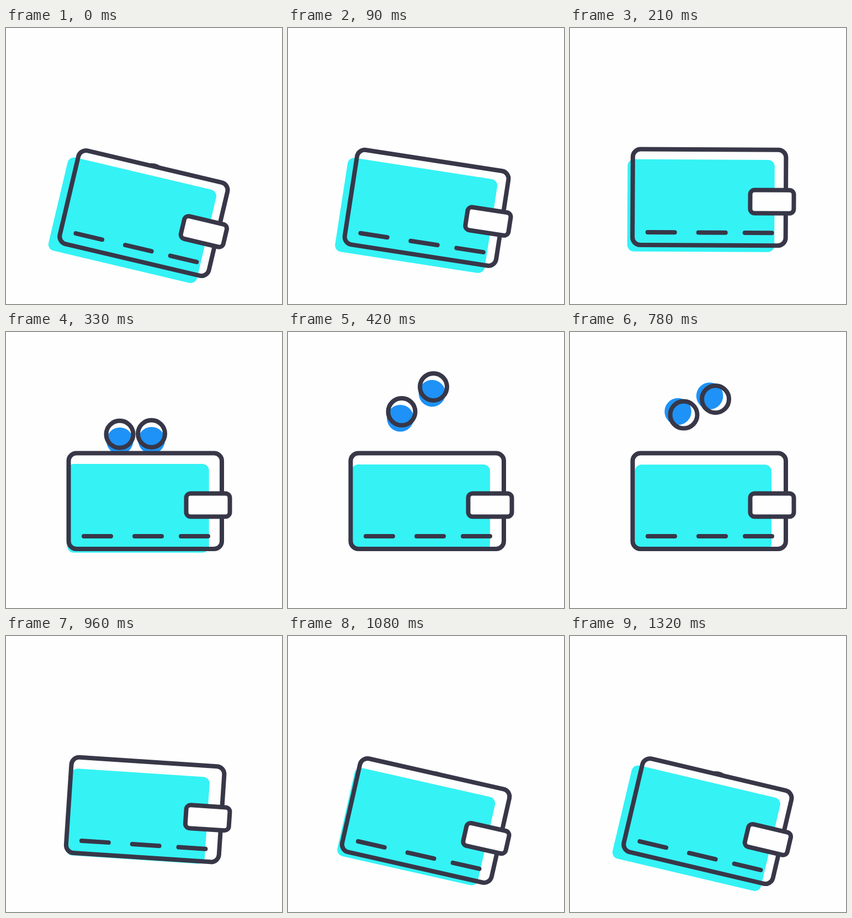
Write an HTML page with a canvas that moves like this. It is 500 px wide and 500 px high and loops after 1350 ms.

```html
<!DOCTYPE html>
<html lang="en">
<head>
<meta charset="utf-8">
<title>Wallet and coins</title>
<style>
  html, body { margin: 0; height: 100%; overflow: hidden; background: #fefefe; }
  canvas { display: block; width: 100vw; height: 100vh; }
</style>
</head>
<body>
<canvas id="stage" width="500" height="500"></canvas>
<script>
const ctx = document.getElementById('stage').getContext('2d');
const LOOP = 1350, STEP = 30;
const INK = '#373748', CYAN = '#35f2f5', BLUE = '#1e92f6', PAPER = '#fefefe';
const DEG = Math.PI / 180, TILT = 13.3 * DEG;
const PIVOT = { x: 125, y: 308.5 }, COIN_REST = 273.5;

const COINS = [
  { x: 206, top: 144.5, rise: 180, fall: 750 },
  { x: 263.5, top: 90.5, rise: 212, fall: 717 }
];

const mix = (a, b, k) => a + (b - a) * k;

function ease(t, start, end) {
  const u = Math.min(1, Math.max(0, (t - start) / (end - start)));
  return u * u * (3 - 2 * u);
}

function box(left, top, right, bottom, radius, fill, stroke) {
  ctx.beginPath();
  ctx.roundRect(left, top, right - left, bottom - top, radius);
  if (fill) { ctx.fillStyle = fill; ctx.fill(); }
  if (stroke) ctx.stroke();
}

function circle(x, y, r) {
  ctx.beginPath();
  ctx.arc(x, y, r, 0, 2 * Math.PI);
}

// The blue disc sits off centre and turns with the coin.
function drawCoin({ x, top, rise, fall }, t) {
  const height = ease(t, rise, rise + 240) - ease(t, fall, fall + 240);
  const y = mix(COIN_REST, top, height);
  if (height > 0) {
    const angle = (88 + 136 * ease(t, 300, 900)) * DEG;
    circle(x + 12 * Math.cos(angle), y + 12 * Math.sin(angle), 24.3);
    ctx.fillStyle = BLUE;
    ctx.fill();
  }
  circle(x, y, 24.5);
  ctx.stroke();
}

// The cyan panel grows past the lower left and towards the upper right.
function drawPanel(t) {
  const shrink = 1 - ease(t, 0, 530);
  const near = shrink + ease(t, 820, 1340), far = shrink + ease(t, 890, 1340);
  box(mix(117.5, 97, near), mix(240.3, 236.5, far),
    mix(365, 373.5, far), mix(395, 410, near), 12, CYAN);
}

function drawWallet(t) {
  ctx.save();
  ctx.translate(PIVOT.x, PIVOT.y);
  ctx.rotate(TILT * (1 - ease(t, 0, 230) + ease(t, 880, 1108)));
  ctx.translate(-PIVOT.x, -PIVOT.y);
  box(113.5, 219.5, 391, 393, 14, PAPER);
  drawPanel(t);
  box(113.5, 219.5, 391, 393, 14, null, true);
  box(326.5, 292.5, 405.5, 334.5, 8, PAPER, true);
  ctx.beginPath();
  for (const x of [141, 233, 317]) {
    ctx.moveTo(x, 370);
    ctx.lineTo(x + 49, 370);
  }
  ctx.stroke();
  ctx.restore();
}

function draw(now) {
  const t = Math.floor(now % LOOP / STEP) * STEP;
  ctx.fillStyle = PAPER;
  ctx.fillRect(0, 0, 500, 500);
  ctx.strokeStyle = INK;
  ctx.lineWidth = 8;
  ctx.lineCap = 'round';
  COINS.forEach(coin => drawCoin(coin, t));
  drawWallet(t);
}

let start;
function frame(now) {
  start ??= now;
  draw(now - start);
  requestAnimationFrame(frame);
}
requestAnimationFrame(frame);
</script>
</body>
</html>
```
